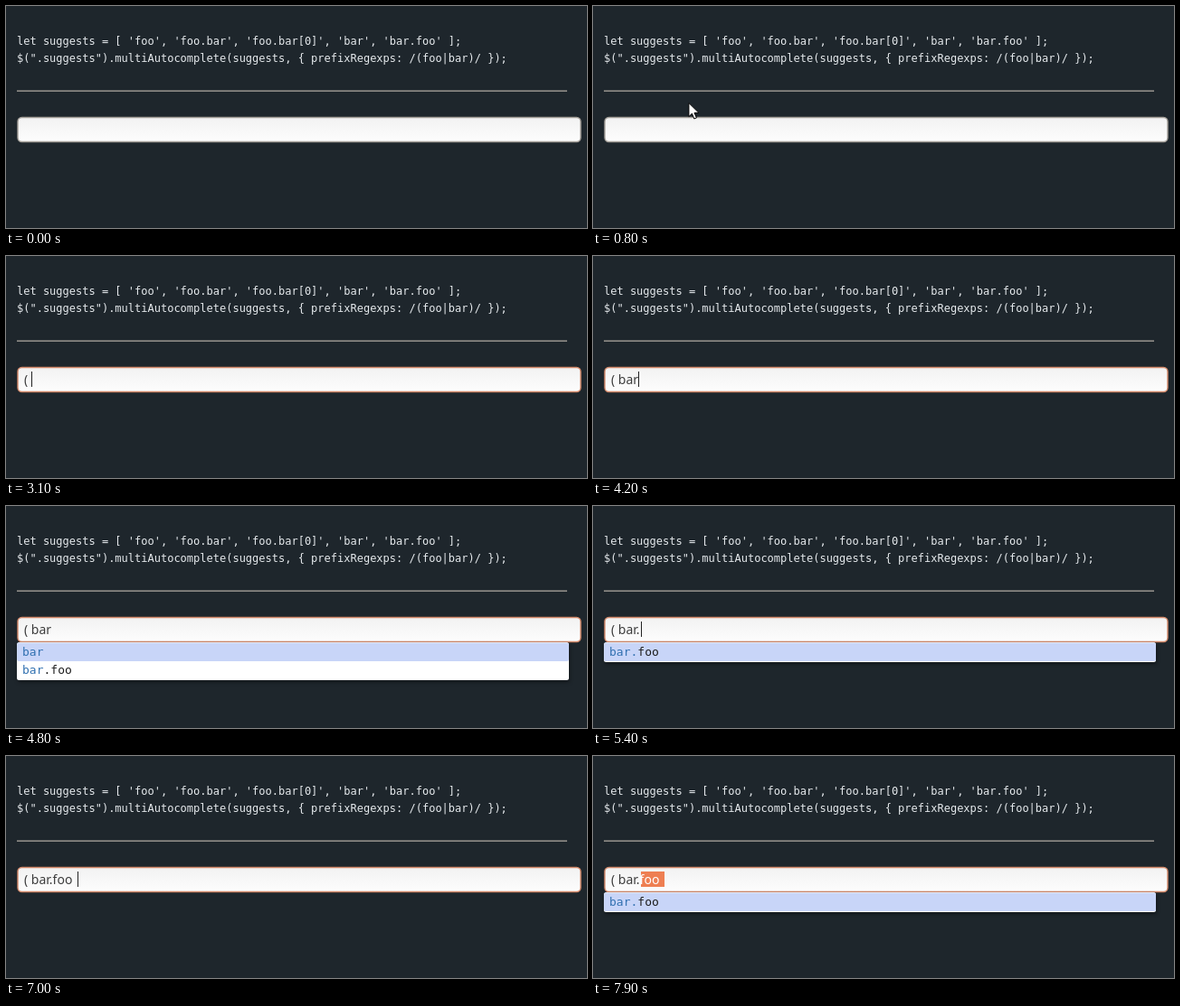
Animation, 642 px wide and 246 px high, one loop 8000 ms. Source, as an HTML page:

```html
<!DOCTYPE html>
<html lang="en">
<head>
<meta charset="utf-8">
<title>Autocomplete demo</title>
<style>
  html, body { margin: 0; width: 100%; height: 100%; overflow: hidden; background: #1e262c; }
  svg { display: block; }
  text { white-space: pre; }
  .code { font: 12px "DejaVu Sans Mono", monospace; fill: #e6eaed; }
  .typed { font: 14px "Noto Sans", sans-serif; fill: #3c3c3c; }
  .option { font: 13px "DejaVu Sans Mono", monospace; fill: #1c1c1c; }
  .match { fill: #3070b0; }
  .picked { fill: #fff; }
  #field { stroke: #a39e98; }
  #field.focus { stroke: #d3896a; }
  #popup { filter: drop-shadow(1px 2px 2px #0006); }
</style>
</head>
<body>
<svg width="642" height="246" viewBox="0 0 642 246">
  <defs>
    <linearGradient id="shade" x2="0" y2="1">
      <stop offset="0" stop-color="#f2f2f2"/>
      <stop offset="1" stop-color="#fdfdfd"/>
    </linearGradient>
  </defs>
  <text class="code" x="12" y="43">let suggests = [ 'foo', 'foo.bar', 'foo.bar[0]', 'bar', 'bar.foo' ];</text>
  <text class="code" x="12" y="62">$(".suggests").multiAutocomplete(suggests, { prefixRegexps: /(foo|bar)/ });</text>
  <rect x="12" y="93" width="608" height="1" fill="#696967"/>
  <rect x="12" y="94" width="608" height="1" fill="#8b8985"/>

  <rect id="field" x="13" y="123.5" width="622" height="27" rx="4.5" fill="url(#shade)" stroke-width="1.4"/>
  <rect id="selection" x="53" y="128" width="26" height="17" fill="#ee7f52"/>
  <text class="typed" x="20" y="142"><tspan id="plain"></tspan><tspan id="picked" class="picked"></tspan></text>
  <rect id="caret" y="128" width="1" height="17" fill="#222"/>

  <g id="popup">
    <rect id="list" x="12" y="151" width="610" rx="2.5" fill="#fff"/>
    <rect x="12" y="151.5" width="610" height="20.5" rx="2" fill="#c8d5f8"/>
    <text class="option" x="18" y="166"><tspan class="match"></tspan><tspan></tspan></text>
    <text class="option" x="18" y="186"><tspan class="match"></tspan><tspan></tspan></text>
  </g>

  <path id="arrow" d="M.5 .5V15.5L4 12.2L6.4 18L9 16.9L6.6 11.3H11.5Z" fill="#fff" stroke="#000"/>
  <g id="beam" fill="none">
    <path d="M-3 -7H-1L0 -6L1 -7H3M0 -6V6M-3 7H-1L0 6L1 7H3" stroke="#fff" stroke-width="3"/>
    <path d="M-3 -7H-1L0 -6L1 -7H3M0 -6V6M-3 7H-1L0 6L1 7H3" stroke="#000"/>
  </g>
</svg>
<script>
const LOOP = 8000;
const $ = id => document.getElementById(id);
const show = (el, on) => { el.style.display = on ? '' : 'none'; };

// Each step changes only the named parts of the state.
const steps = [
  [0,    { text: '', picked: '', caret: 0, options: [], matched: 0, focus: false }],
  [1200, { focus: true, caret: 20 }],
  [2500, { caret: 0 }],
  [2700, { text: '(', caret: 25 }],
  [3100, { text: '( ', caret: 28 }],
  [3600, { text: '( ba', caret: 44 }],
  [4200, { text: '( bar', caret: 50 }],
  [4300, { options: ['bar', 'bar.foo'], matched: 3 }],
  [4800, { caret: 0 }],
  [5400, { text: '( bar.', caret: 53, options: ['bar.foo'], matched: 4 }],
  [6100, { caret: 0 }],
  [6500, { text: '( bar.foo', caret: 76 }],
  [6600, { matched: 7 }],
  [7000, { text: '( bar.foo ', caret: 79, options: [] }],
  [7200, { caret: 0 }],
  [7800, { text: '( bar.', picked: 'foo ' }],
  [7900, { options: ['bar.foo'], matched: 4 }],
];

const stateAt = t => Object.assign({}, ...steps.filter(s => s[0] <= t).map(s => s[1]));

function drawPointer(t) {
  const time = Math.floor(t / 100) * 100;
  const k = Math.min(1, Math.max(0, (time - 400) / 500));
  let x = 83 + 28 * k, y = 51 + 70 * k;
  if (time >= 1100) [x, y] = [114.5, 134.5];
  const visible = time >= 400 && time < 1600;
  const overText = y < 66 || y > 123;
  show($('beam'), visible && overText);
  show($('arrow'), visible && !overText);
  for (const id of ['beam', 'arrow']) $(id).setAttribute('transform', `translate(${x} ${y})`);
}

function drawPopup({ options, matched }) {
  show($('popup'), options.length);
  $('list').setAttribute('height', 2 + 20 * options.length);
  document.querySelectorAll('.option').forEach((row, i) => {
    const word = options[i] || '';
    row.children[0].textContent = word.slice(0, matched);
    row.children[1].textContent = word.slice(matched);
  });
}

function draw(t) {
  const state = stateAt(t);
  $('field').classList.toggle('focus', state.focus);
  $('plain').textContent = state.text;
  $('picked').textContent = state.picked;
  show($('selection'), state.picked);
  show($('caret'), state.caret);
  $('caret').setAttribute('x', state.caret);
  drawPopup(state);
  drawPointer(t);
}

const start = performance.now();
function tick() {
  draw((performance.now() - start) % LOOP);
  requestAnimationFrame(tick);
}
tick();
</script>
</body>
</html>
```
